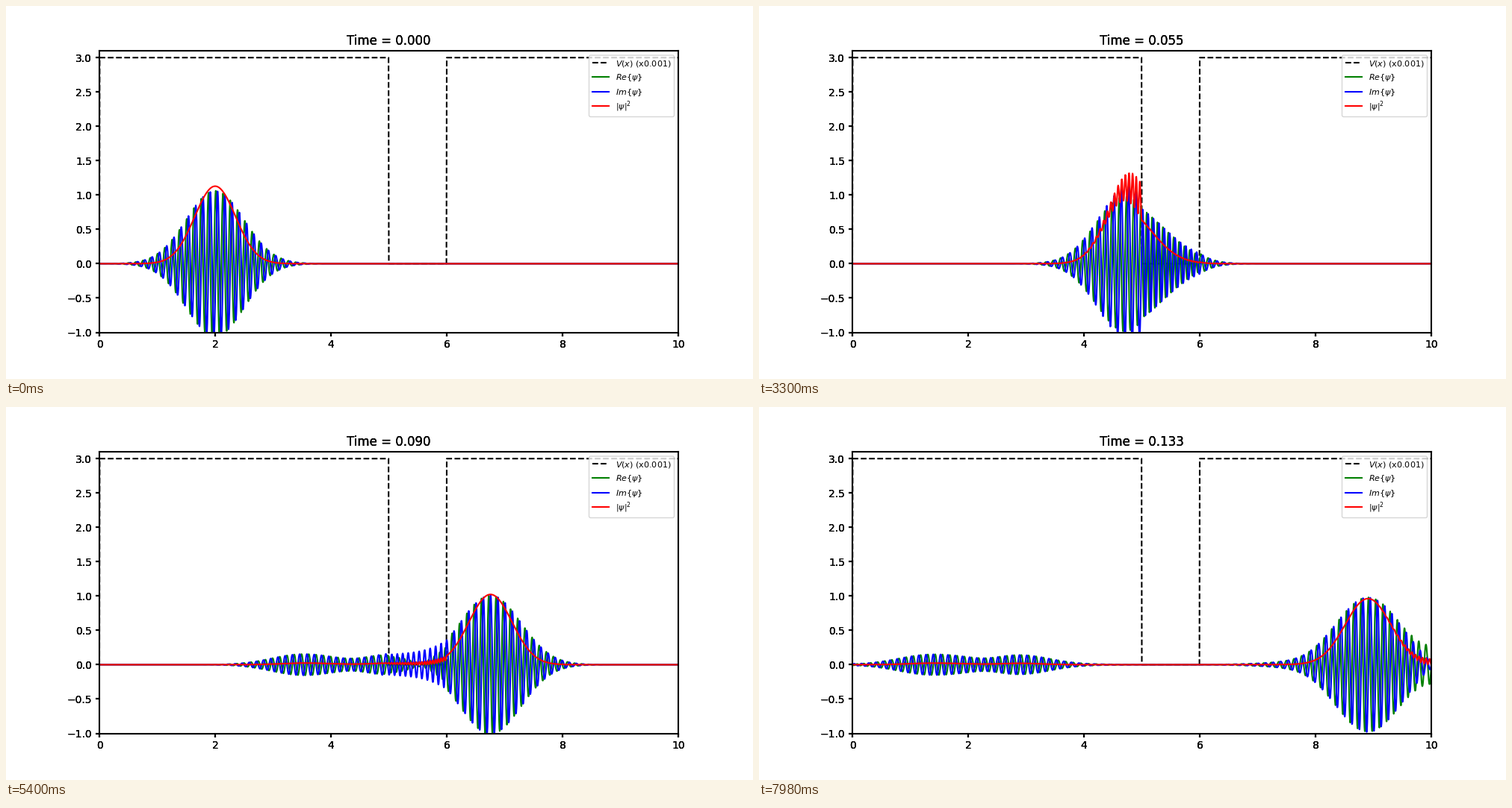
Animation, 1000 px wide and 500 px high, one loop 8000 ms. Source, as a matplotlib script:

```python
import numpy as np
import matplotlib.pyplot as plt
from matplotlib.animation import FuncAnimation
from matplotlib.lines import Line2D
from matplotlib.patches import FancyBboxPatch
from matplotlib.transforms import Affine2D

WIDTH, HEIGHT = 1000, 500
LOOP_MS, INTERVAL_MS, STEP_MS = 8000, 40, 60
DT = 0.001  # simulated time per step

# Physics (hbar = m = 1): wave packet crossing a square well
LENGTH, DX = 10.0, 0.005
X0, SIGMA, K0 = 2.0, 0.5, 50.0
BARRIER = 1000.0
N_MODES = 600


def solve(x, outside, times):
    """Evolve the packet exactly in a sine basis; one column per time."""
    k = np.arange(1, N_MODES + 1) * np.pi / LENGTH
    modes = np.sqrt(2 / LENGTH) * np.sin(np.outer(x, k))
    potential = BARRIER * outside
    h = np.diag(k**2 / 2) + modes.T @ (potential[:, None] * modes) * DX
    energy, states = np.linalg.eigh(h)

    norm = 1 / np.sqrt(SIGMA * np.sqrt(np.pi))
    start = norm * np.exp(-((x - X0) ** 2) / (2 * SIGMA**2) + 1j * K0 * x)
    weights = states.T @ (modes.T @ start * DX)
    phases = np.exp(-1j * np.outer(energy, times))
    return modes @ (states @ (weights[:, None] * phases))


x = np.arange(0, LENGTH, DX)
outside = ((x > 0) & ((x < 5 - DX / 2) | (x > 6 - DX / 2))).astype(float)
n_steps = -(-LOOP_MS // STEP_MS)
psi = solve(x, outside, np.arange(n_steps) * DT)

plt.rcParams["font.family"] = "DejaVu Sans"
plt.rcParams["axes.linewidth"] = 1.5
fig = plt.figure(figsize=(WIDTH / 100, HEIGHT / 100), dpi=100)
BOX = [0.125, 0.125, 0.775, 0.755]


def add_axes(**kwargs):
    ax = fig.add_axes(BOX, **kwargs)
    ax.set(xlim=(0, LENGTH), ylim=(-1, 3.1),
           xticks=np.arange(0, 11, 2), yticks=np.arange(-1, 3.1, 0.5))
    ax.tick_params(width=1.5)
    return ax


# Repeated transparent layers darken the edges of the outer text
ax = add_axes()
layers = [ax] + [add_axes(frameon=False, label=f"layer{i}") for i in range(2)]
titles = [layer.set_title("", fontsize=12) for layer in layers]

ax.plot(x, 3 * outside, "k--", lw=1.5)
re_line, = ax.plot([], [], "g", lw=1.5)
im_line, = ax.plot([], [], "b", lw=1.5)
density_line, = ax.plot([], [], "r", lw=1.5)


def add_legend():
    # Pixel coordinates with the origin at the top left
    px = Affine2D().scale(1 / WIDTH, -1 / HEIGHT).translate(0, 1) + fig.transFigure
    fig.add_artist(FancyBboxPatch(
        (780.5, 66), 114, 82.5, boxstyle="round,pad=0,rounding_size=2.2",
        fc="white", ec="0.8", lw=1, alpha=0.8, transform=px, zorder=5))
    rows = [
        ("k", "--", r"$V(x)$ (x0.001)"),
        ("g", "-", r"$Re\{\psi\}$"),
        ("b", "-", r"$Im\{\psi\}$"),
        ("r", "-", r"$|\psi|^2$"),
    ]
    for i, (color, style, label) in enumerate(rows):
        y = 76 + 19.3 * i
        fig.add_artist(Line2D([784.5, 806.7], [y, y], color=color, ls=style,
                              lw=1.5, transform=px, zorder=6))
        fig.text(815.6, y + 4, label, fontsize=8, va="baseline",
                 transform=px, zorder=6)


def update(frame):
    step = min((frame * INTERVAL_MS + INTERVAL_MS // 2) // STEP_MS, n_steps - 1)
    wave = psi[:, step]
    re_line.set_data(x, wave.real)
    im_line.set_data(x, wave.imag)
    density_line.set_data(x, np.abs(wave) ** 2)
    for title in titles:
        title.set_text(f"Time = {step * DT:.3f}")
    return [re_line, im_line, density_line, *titles]


add_legend()
anim = FuncAnimation(fig, update, frames=LOOP_MS // INTERVAL_MS,
                     init_func=lambda: update(0), interval=INTERVAL_MS,
                     repeat=True, repeat_delay=0, blit=False)
plt.show()
```
